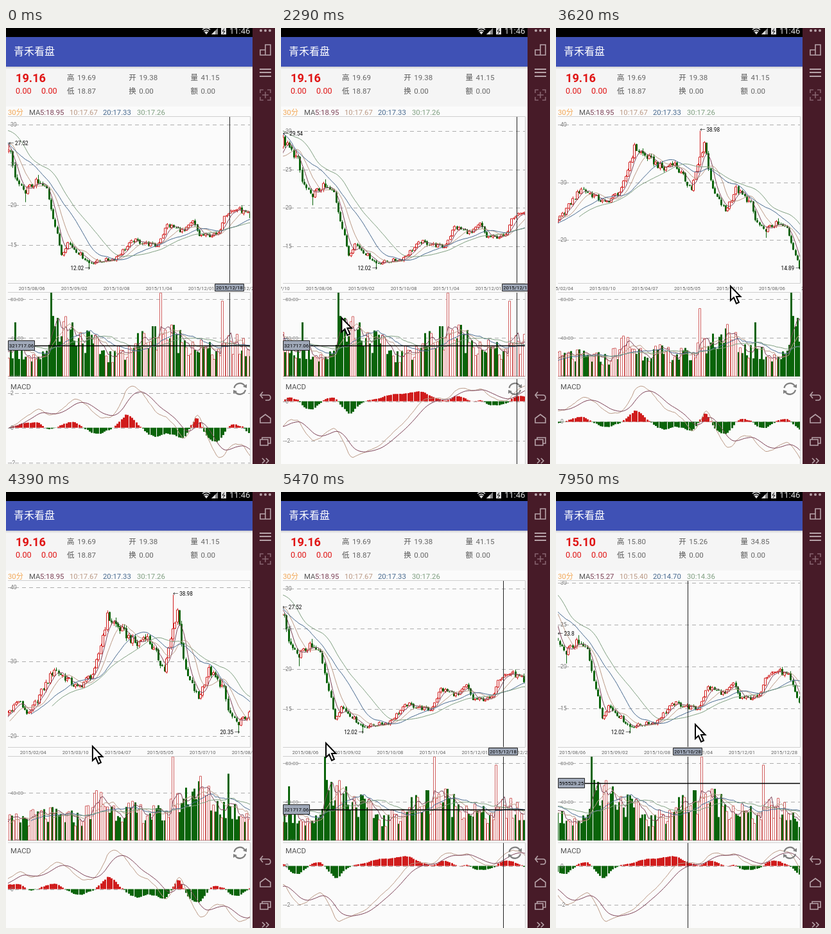
These frames come from a looping animation (419 px wide and 677 px high, 8000 ms). An HTML page with a canvas:

```html
<!DOCTYPE html>
<html lang="zh">
<head>
<meta charset="utf-8">
<style>
html, body { margin: 0; width: 100%; height: 100%; overflow: hidden; }
canvas { display: block; }
</style>
</head>
<body>
<canvas id="c" width="419" height="677"></canvas>
<script>
const g = document.getElementById('c').getContext('2d');
const LOOP = 8000, STEP = 3.3, N = 230, LEFT = 3, RIGHT = 380;
const RED = '#d01c1c', GREEN = '#0a640a';
const MA_DAYS = [5, 10, 20, 30];
const MA_COLORS = ['#7d4257', '#bb9a86', '#47698f', '#7f9f80'];
const DATES = '01/07 02/04 03/10 04/07 05/05 07/10 08/06 09/02 10/08 11/04 12/01 12/28'.split(' ');

// Turning points of the market: [candle, value]
const TREND = [[0, 20.5], [13, 24.7], [18, 22.8], [30, 29], [41, 26.4], [49, 28.6], [55, 36],
  [69, 32.2], [73, 33.6], [82, 28.8], [88, 37], [92, 28.5], [98, 25], [103, 28.8], [110, 26.3],
  [112, 23.4], [116, 21.6], [122, 22.8], [127, 22], [134, 13.9], [137, 15.3], [147, 12.8],
  [159, 13.3], [168, 15.6], [179, 14.9], [184, 17.5], [192, 16.7], [196, 17.9], [199, 16.2],
  [208, 16.3], [211, 18.9], [217, 19.5], [222, 18.8], [230, 13.8]];
const TURNOVER = [[0, 16], [25, 26], [43, 22], [51, 44], [57, 32], [82, 26], [97, 56], [106, 36],
  [126, 24], [130, 74], [158, 24], [170, 44], [182, 56], [206, 30], [215, 42], [230, 22]];
const HIGHS = { 86: 38.98, 109: 27.52, 113: 23.8, 123: 23.74 };
const LOWS = { 117: 20.35, 147: 12.02 };
const SPIKES = { 86: 70.3, 112: 56, 129: 86.67, 181: 86.5, 210: 78 };

const rand = (i, k) => {
  const s = Math.sin(i * 12.9898 + k * 78.233) * 43758.5453;
  return s - Math.floor(s);
};
const along = (points, i) => {
  const n = points.findIndex(p => p[0] > i);
  const [[x0, y0], [x1, y1]] = [points[n - 1], points[n]];
  return y0 + (y1 - y0) * (i - x0) / (x1 - x0);
};
const series = f => Array.from({ length: N }, (_, i) => f(i));
const average = (a, n) => a.map((_, i) =>
  i < n - 1 ? null : a.slice(i - n + 1, i + 1).reduce((s, v) => s + v) / n);
const ema = (a, n) => {
  let e = a[0];
  return a.map(v => e += (v - e) * 2 / (n + 1));
};

const close = series(i => along(TREND, i) * (1 + (rand(i, 1) - 0.5) * 0.036));
const open = series(i => (close[i - 1] || 20.3) * (1 + (rand(i, 2) - 0.5) * 0.008));
const high = series(i => HIGHS[i] || Math.max(open[i], close[i]) * (1 + rand(i, 3) * 0.013));
const low = series(i => LOWS[i] || Math.min(open[i], close[i]) * (1 - rand(i, 4) * 0.013));
const volume = series(i => SPIKES[i] || along(TURNOVER, i) * (0.5 + rand(i, 5) * 0.62));
const priceMa = MA_DAYS.map(n => average(close, n));
const volumeMa = MA_DAYS.map(n => average(volume, n));
const slow = ema(close, 26);
const dif = ema(close, 12).map((v, i) => v - slow[i]);
const dea = ema(dif, 9);
const hist = dif.map((v, i) => v - dea[i]);

// Quote shown in the header and the marked day
const QUOTES = [
  { from: 0, pos: 638.8, date: '2015/12/18', ohlv: ['19.16', '19.69', '19.38', '41.15', '18.87'],
    ma: ['18.95', '17.67', '17.33', '17.26'] },
  { from: 6250, pos: 502.5, date: '2015/10/26', ohlv: ['15.52', '15.83', '15.66', '43.74', '15.29'],
    ma: ['15.30', '15.37', '14.55', '14.35'] },
  { from: 6640, pos: 509.8, date: '2015/10/28', ohlv: ['15.10', '15.80', '15.26', '34.85', '15.00'],
    ma: ['15.27', '15.40', '14.70', '14.36'] }];

// Moves: [begin, end, target...]; values rest in between
const SCROLL = [[2220, 2760, 145.5], [2760, 2930, 106], [3080, 3930, -70.65], [4160, 4390, -42.5],
  [4390, 4860, 100], [5090, 5470, 292], [5470, 5780, 312], [7570, 7950, 304.5]];
const LEVEL = [[6249, 6250, 78.287462], [6880, 7420, 59.552925]];
const POINTER = [[270, 350, 316, 620], [580, 1120, 213, 397], [1440, 1900, 65, 456],
  [2220, 2760, 281, 403], [2760, 2930, 320, 402], [3080, 3080, 150, 400], [3080, 3930, 340, 400],
  [4160, 4160, 163, 396], [4160, 4390, 134, 394], [4390, 4860, 75, 392], [5090, 5090, 200, 394],
  [5090, 5470, 69, 389], [5950, 6330, 193, 426], [6560, 6710, 200, 426], [6880, 7420, 200, 455],
  [7570, 7950, 216, 360]];

function track(t, start, moves) {
  let v = start;
  for (const [t0, t1, ...to] of moves) {
    if (t < t0) break;
    const p = t < t1 ? (t - t0) / (t1 - t0) : 1;
    v = v.map((a, k) => a + (to[k] - a) * p);
  }
  return v;
}

function rect(x, y, w, h, color) {
  g.fillStyle = color;
  g.fillRect(x, y, w, h);
}
function text(s, x, y, size, color, align = 'left', weight = 400) {
  g.font = `${weight} ${size}px Roboto, "Noto Sans CJK SC", "Noto Sans CJK", sans-serif`;
  g.textAlign = align;
  g.fillStyle = color;
  g.fillText(s, x, y);
}
function stroke(d, color, width = 1, dash = []) {
  g.strokeStyle = color;
  g.lineWidth = width;
  g.setLineDash(dash);
  g.stroke(new Path2D(d));
  g.setLineDash([]);
}
function fill(d, color) {
  g.fillStyle = color;
  g.fill(new Path2D(d));
}
function tag(s, x, y, w, h, size) {
  rect(x, y, w, h, '#9fa8b8');
  stroke(`M${x} ${y}h${w}v${h}h${-w}z`, '#222');
  text(s, x + w / 2, y + h / 2 + size * 0.36, size, '#000', 'center');
}

const px = (i, s) => i * STEP - 66 - s;
const visible = s => [Math.max(0, Math.ceil((s + 67.3) / STEP)),
  Math.min(N - 1, Math.floor((s + 447.7) / STEP))];

function extent(lists, s) {
  const [a, b] = visible(s);
  const all = lists.flatMap(l => l.slice(a, b + 1)).filter(v => v !== null);
  return [Math.min(...all), Math.max(...all)];
}
function padded(lists, s) {
  const [a, b] = extent(lists, s), pad = (b - a) * 0.1;
  return [a - pad, b + pad];
}
function interval(raw) {
  const m = 10 ** Math.floor(Math.log10(raw)), r = Math.round(raw / m);
  return (r > 5 ? 10 : r) * m;
}

// Clipped chart area with grid; draw(toY, first, last) paints the data
function pane(top, bottom, [lo, hi], parts, digits, s, draw) {
  const toY = v => bottom - (v - lo) / (hi - lo) * (bottom - top);
  const gap = interval((hi - lo) / parts), marks = [];
  for (let v = Math.ceil(lo / gap) * gap; v <= hi; v += gap) marks.push(v);
  g.save();
  g.beginPath();
  g.rect(LEFT, top, RIGHT - LEFT, bottom - top);
  g.clip();
  marks.forEach(v => stroke(`M3 ${Math.round(toY(v)) + 0.5}H380`, '#adadad', 1, [6, 5]));
  draw(toY, ...visible(s));
  marks.forEach(v => text((v + 0).toFixed(digits), 7, toY(v) + 3, digits ? 8 : 8.6, '#777'));
  g.restore();
  stroke(`M3 ${top - 0.5}H380.5V${bottom + 0.5}H3`, '#cfcfcf');
  return toY;
}
function curve(list, s, toY, color) {
  const [a, b] = visible(s);
  let d = '';
  for (let i = Math.max(0, a - 1); i <= Math.min(N - 1, b + 1); i++)
    if (list[i] !== null) d += `${d ? 'L' : 'M'}${px(i, s)} ${toY(list[i])}`;
  stroke(d, color);
}
function bar(i, s, y0, y1, color) {
  const x = Math.round(px(i, s)), top = Math.min(y0, y1), h = Math.max(1, Math.abs(y1 - y0));
  if (close[i] < open[i]) return rect(x - 1, top, 3, h, GREEN);
  rect(x - 1, top, 2, h, '#fff');
  stroke(`M${x - 1.5} ${top}h3v${h}h-3z`, color);
}

function drawPrices(s) {
  const lists = [high, low, ...priceMa];
  pane(138, 396, padded(lists, s), 4, 0, s, (toY, a, b) => {
    for (let i = a; i <= b; i++) {
      const x = Math.round(px(i, s)) + 0.5;
      stroke(`M${x} ${toY(high[i])}V${toY(low[i])}`, close[i] < open[i] ? GREEN : RED);
      bar(i, s, toY(open[i]), toY(close[i]), RED);
    }
    priceMa.forEach((l, k) => curve(l, s, toY, MA_COLORS[k]));
    const max = Math.max(...high.slice(a, b + 1)), min = Math.min(...low.slice(a, b + 1));
    text('← ' + +max.toFixed(2), px(high.indexOf(max), s), toY(max) + 1, 8.2, '#000');
    text(+min.toFixed(2) + ' →', px(low.indexOf(min), s) + 2, toY(min) + 1, 8.2, '#000', 'right');
  });
  g.save();
  g.beginPath();
  g.rect(0, 397, 384, 14);
  g.clip();
  DATES.forEach((d, k) => text('2015/' + d, px(k * 20, s), 407, 7.7, '#666', 'center'));
  g.restore();
}

function drawVolumes(s) {
  return pane(411, 541, [0, extent([volume], s)[1]], 2, 2, s, (toY, a, b) => {
    for (let i = a; i <= b; i++) bar(i, s, 541, toY(volume[i]), '#d06060');
    volumeMa.forEach((l, k) => curve(l, s, toY, MA_COLORS[k]));
  });
}

function drawMacd(s) {
  pane(545, 678, padded([dif, dea, hist], s), 2, 0, s, (toY, a, b) => {
    for (let i = a; i <= b; i++)
      rect(Math.round(px(i, s)) - 1, toY(0), 3, toY(hist[i]) - toY(0), hist[i] > 0 ? RED : GREEN);
    curve(dif, s, toY, MA_COLORS[1]);
    curve(dea, s, toY, MA_COLORS[0]);
  });
  text('MACD', 7, 561, 11.3, '#555');
  stroke('M355.5 559A9 9 0 0 1 372 556M373 562A9 9 0 0 1 357 565', '#808080', 2.3);
  fill('M369 557l6-4v6zM360 564l-6 4v-6z', '#808080');
}

function drawMarker(q, level, s, macdS, volY) {
  const x = Math.floor(q.pos - s) + 0.5, mx = Math.floor(q.pos - macdS) + 0.5;
  if (mx < RIGHT) stroke(`M${mx} 545V677`, '#222');
  if (x > RIGHT) return;
  stroke(`M${x} 138V396M${x} 411V541`, '#222');
  const y = Math.round(volY(level)) + 0.5;
  stroke(`M3 ${y}H380`, '#000', 1.3);
  tag((level * 1e4).toFixed(2), 3.5, y - 8, 41, 15, 8.1);
  tag(q.date, x - 23, 397.5, 45, 11, 7.9);
}

function drawHeader(q) {
  rect(0, 0, 384, 14, '#000');
  stroke('M306 2.5Q312 -2.5 318 2.5M308 5Q312 1.5 316 5', '#ddd', 1.5);
  fill('M309 6.5Q312 4 315 6.5L312 10z', '#ddd');
  fill('M320 10L330 0V10z', '#888');
  fill('M320 10L326 4V10z', '#ddd');
  fill('M335 0h8v10h-8z', '#ddd');
  stroke('M340 1l-3 4h4l-3 4', '#000');
  text('11:46', 348, 9, 13, '#ddd');
  rect(0, 60, 384, 62, '#f5f5f5');
  const shade = g.createLinearGradient(0, 60, 0, 64);
  shade.addColorStop(0, '#cfcfd2');
  shade.addColorStop(1, '#f5f5f5');
  rect(0, 60, 384, 4, shade);
  rect(0, 14, 384, 46, '#3f51b5');
  text('青禾看盘', 12, 42, 16, '#fff');

  const [last, hi, op, vol, lo] = q.ohlv;
  text(last, 15, 84, 18.2, '#e01414', 'left', 700);
  text('0.00', 15, 102, 12.6, '#e01414');
  text('0.00', 55, 102, 12.6, '#e01414');
  [['高', hi, '低', lo], ['开', op, '换', '0.00'], ['量', vol, '额', '0.00']].forEach((c, k) => {
    const x = 95 + k * 96.3;
    text(c[0], x, 81, 11.5, '#555');
    text(c[1], x + 16, 81, 11.5, '#666');
    text(c[2], x, 102, 11.5, '#555');
    text(c[3], x + 16, 102, 11.5, '#666');
  });
  text('30分', 3, 134.5, 11.3, '#f2a654');
  text('MA', 36, 134.5, 11.3, '#555');
  MA_DAYS.forEach((n, k) => text(`${n}:${q.ma[k]}`, [53, 99, 151, 204][k], 134.5, 11.3, MA_COLORS[k]));
}

function drawSidebar() {
  rect(384, 0, 35, 677, '#471b28');
  const c = '#b7a3a9';
  [397, 404, 411].forEach(x => fill(`M${x - 2} 4a2 2 0 0 1 4 0a2 2 0 0 1 -4 0`, c));
  stroke('M396 34h8v8h-8zM404 42V26h8v16z', c, 1.6);
  stroke('M395 64h18M395 69h18M395 75h18', c, 2);
  stroke('M396 101v-5h5M407 96h5v5M412 107v5h-5M401 112h-5v-5M404 99v10M399 104h10', '#85626d', 1.6);
  stroke('M400 565l-4 5 4 5M396 570h12q4 0 4 4t-4 4h-4', c, 1.6);
  stroke('M396 606l8-6 8 6v7h-16z', c, 1.6);
  stroke('M396 639h12v9h-12zM399 639v-3h13v9h-4', c, 1.6);
  stroke('M399 668l4 4-4 4M405 668l4 4-4 4', c, 1.6);
}

function drawPointer(x, y) {
  g.save();
  g.translate(x, y);
  const d = 'M1 1V23L6 18.5L10 28L14 26L10 17H16.5z';
  fill(d, '#fff');
  stroke(d, '#000', 2);
  g.restore();
}

function frame(now) {
  const t = now % LOOP;
  const [s] = track(t, [289.8], SCROLL), [level] = track(t, [32.171706], LEVEL);
  const macdS = t < 2220 ? -70.65 : s; // the lower pane follows from the first drag on
  const q = QUOTES.filter(k => t >= k.from).pop();
  rect(0, 0, 419, 677, '#fbfbfb');
  drawHeader(q);
  drawPrices(s);
  const volY = drawVolumes(s);
  drawMacd(macdS);
  drawMarker(q, level, s, macdS, volY);
  drawSidebar();
  if (t >= 270) drawPointer(...track(t, [322, 677], POINTER));
  requestAnimationFrame(frame);
}
requestAnimationFrame(frame);
</script>
</body>
</html>
```
